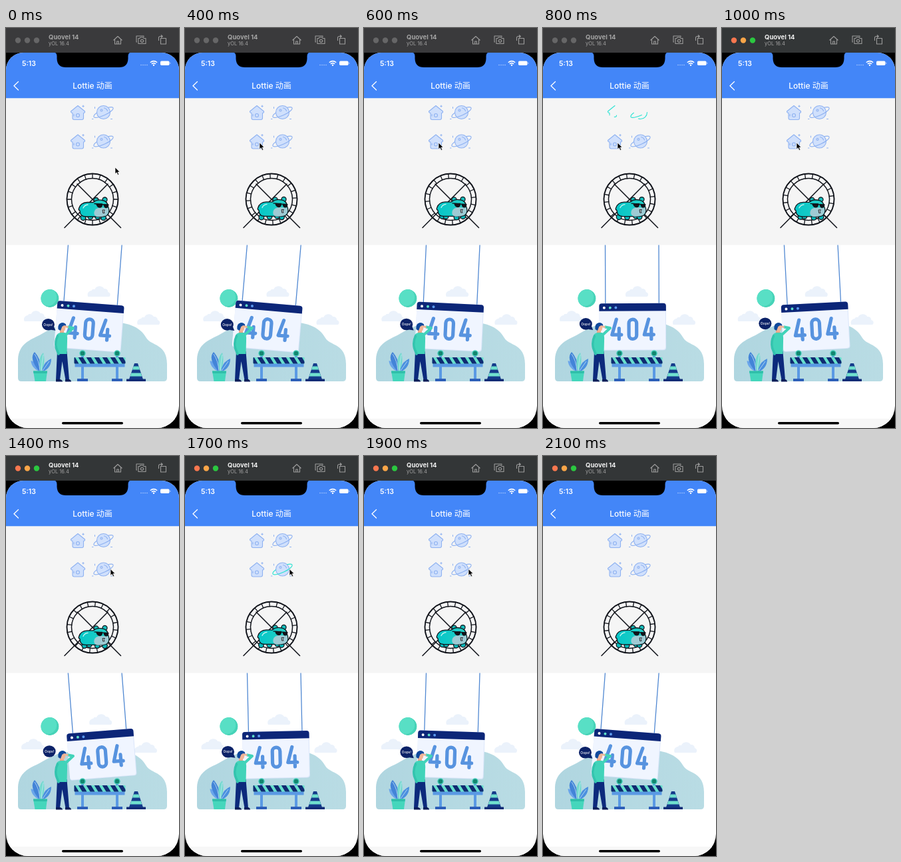
These frames come from a looping animation (260x600 px, 2.2 s). An HTML page:

```html
<!DOCTYPE html>
<html lang="zh">
<head>
<meta charset="utf-8">
<title>Lottie 动画</title>
<style>
  html, body { margin: 0; width: 100%; height: 100%; overflow: hidden; background: #000; }
  svg { display: block; }
  text { font-family: Inter, "Noto Sans CJK SC", "Noto Sans CJK", sans-serif; }
  .ink { fill: none; stroke: #10131a; stroke-linecap: round; stroke-linejoin: round; }
  .tool { fill: none; stroke: #9c9c9c; stroke-width: 1.1; stroke-linejoin: round; }
  .icon { stroke-width: 1.1; stroke-linecap: round; stroke-linejoin: round; }
</style>
</head>
<body>
<svg width="260" height="600" viewBox="0 0 260 600">
  <defs>
    <clipPath id="screen"><path d="M0 63a26 26 0 0 1 26-26H234a26 26 0 0 1 26 26V567a33 33 0 0 1-33 33H33a33 33 0 0 1-33-33Z"/></clipPath>
    <clipPath id="stage"><rect y="325.500" width="260" height="261"/></clipPath>
    <clipPath id="rail"><rect x="102.500" y="494" width="77" height="9.500" rx="1"/></clipPath>
    <clipPath id="round"><circle cx="66" cy="405.500" r="13.600"/></clipPath>
    <linearGradient id="hillTone"><stop stop-color="#b0d6e0"/><stop offset="1" stop-color="#b9dce4"/></linearGradient>
    <linearGradient id="fur"><stop stop-color="#05c6c8"/><stop offset="1" stop-color="#25cfc4"/></linearGradient>
    <path id="cloud" d="M-16 8a6 6 0 0 1 5-9a4 4 0 0 1 5-2a8 8 0 0 1 14-1a5 5 0 0 1 6 5a4 4 0 0 1 2 7Z"/>
    <path id="four" d="M9.500 2.500L3 25.500H17M13.500 16V32" fill="none" stroke="#5793df" stroke-width="5.200" stroke-linecap="round" stroke-linejoin="round"/>
  </defs>

  <!-- window bar -->
  <rect id="bar" width="260" height="37"/>
  <g id="lights"><circle cx="18" cy="18.500" r="4.200"/><circle cx="32" cy="18.500" r="4.200"/><circle cx="46" cy="18.500" r="4.200"/></g>
  <text id="device" x="64" y="17" font-size="9.500" font-weight="700">Quovel 14</text>
  <text x="64" y="26.300" font-size="7.500" fill="#a0a0a0">yOL 16.4</text>
  <g class="tool">
    <path d="M161.500 18.500L168 12.500L174.500 18.500M163.500 17.500V24H172.500V17.500M166.700 24V20H169.300V24"/>
    <path d="M199 15.500H201L202 14H206L207 15.500H210V23.500H199ZM197 21H196V12H207V13.500"/>
    <circle cx="204.500" cy="19.300" r="2.100"/>
    <path d="M232.500 15.500H240.500V24H232.500ZM229.500 19V14.500Q229.500 12.500 232 12.500H235M233 10.500L235.300 12.500L233 14.500"/>
  </g>

  <!-- phone -->
  <g clip-path="url(#screen)">
    <rect y="37" width="260" height="563" fill="#fff"/>
    <rect y="37" width="260" height="68.500" fill="#4386f8"/>
    <rect y="105.500" width="260" height="220" fill="#f5f5f5"/>
    <rect y="586" width="260" height="14" fill="#f7f7f7"/>
    <path d="M73 37Q76 37 76.500 42V46Q77 59 90 59H170Q183 59 183.500 46V42Q184 37 187 37Z"/>
    <rect x="84" y="591" width="92" height="3.400" rx="1.700"/>
  </g>
  <g fill="#fff">
    <text x="24" y="57" font-size="10.500" font-weight="600">5:13</text>
    <text x="130" y="91" font-size="12" font-weight="500" text-anchor="middle">Lottie 动画</text>
    <g opacity=".6"><circle cx="203" cy="55.500" r=".8"/><circle cx="206" cy="55.500" r=".8"/><circle cx="209" cy="55.500" r=".8"/><circle cx="212" cy="55.500" r=".8"/></g>
    <rect x="232" y="49.500" width="13.500" height="6.500" rx="1.700"/>
    <rect x="246.300" y="51.500" width="1" height="2.500" rx=".5" opacity=".6"/>
    <g fill="none" stroke="#fff" stroke-width="1.500">
      <path d="M216.800 51.800Q222 47.400 227.200 51.800M218.800 54Q222 51.200 225.200 54"/>
      <path d="M18.500 80.500L12 86.700L18.500 93" stroke-width="1.300" stroke-linecap="round"/>
    </g>
    <circle cx="222" cy="55.700" r="1.200"/>
  </g>

  <g id="icons"></g>

  <!-- wheel -->
  <g class="ink" stroke-width="1.500">
    <path d="M88 299.500L153 234M172.500 299.500L107 234"/>
    <circle cx="130" cy="257" r="38.500" stroke-width="1.900"/>
    <circle cx="130" cy="257" r="31.500"/>
    <path id="rungs" stroke-width="1.300"/>
  </g>
  <g id="hamster" class="ink" stroke-width="1.300">
    <circle cx="135.500" cy="258" r="3.500" fill="#17bfbd"/>
    <circle cx="148.500" cy="257.500" r="3.500" fill="#17bfbd"/>
    <g id="legs" fill="#08b9ba"></g>
    <path d="M111 274Q108.500 273 109.500 270.500Q112 262 122 261.500H131Q137 256.500 145 258.500Q153 260 153.500 268Q157 276 152 281Q147 284 137 283H120Q111 283 111 274Z" fill="url(#fur)"/>
    <path d="M132.500 276Q134 269.500 142 269.500L153.500 270Q156 277 150 281.500Q143 284 136 283Q131.500 281 132.500 276Z" fill="#9fcbd4" stroke="none"/>
    <path d="M116 270Q118 265.500 123 265" stroke="#c9f7f2"/>
    <path d="M133 263.500L154 265.500"/>
    <path d="M136 264H144.500Q144.500 269.500 140.500 269Q137 268.500 136 264ZM147 265H153.500Q153.500 269.500 150.500 269.500Q148 269.500 147 265Z" fill="#10131a"/>
    <path d="M145.500 273L148.500 273L147 275L148 277.500H146Z" fill="#e9f4f6" stroke-width=".9"/>
  </g>

  <!-- 404 scene -->
  <g clip-path="url(#stage)">
    <g fill="#ebf2fb">
      <use id="cloudA" href="#cloud"/><use id="cloudB" href="#cloud"/><use id="cloudC" href="#cloud"/>
    </g>
    <path d="M23 530Q18 530 18 525V497C19 474 36 468 50 461C66 452 76 445 94 444C115 442 132 441 150 441C186 440 203 450 211 465C218 477 242 473 242 504V525Q242 530 237 530Z" fill="url(#hillTone)"/>
    <g clip-path="url(#round)">
      <circle cx="66" cy="405.500" r="13.600" fill="#47d3b8"/>
      <circle cx="62.500" cy="403.500" r="13.600" fill="#58dfc5"/>
    </g>
    <g id="sign">
      <path d="M93.500 300V415M174 300V415" stroke="#5088d2" stroke-width="1.300"/>
      <rect x="84" y="413" width="100.500" height="70.500" rx="4" fill="#dbe6fa"/>
      <rect x="84" y="413" width="99.500" height="69.500" rx="4" fill="#f0f5ff"/>
      <path d="M84 424.500V417Q84 413 88 413H180.500Q184.500 413 184.500 417V424.500Z" fill="#0c2678"/>
      <circle cx="91.500" cy="419.500" r="2" fill="#fff"/><circle cx="100.500" cy="419.500" r="2" fill="#5ee0c8"/><circle cx="109" cy="419.500" r="2" fill="#5c9af0"/>
      <use href="#four" x="100.300" y="434.500"/>
      <use href="#four" x="148.800" y="434.500"/>
      <rect x="128.600" y="437.100" width="11.600" height="29.400" rx="5.800" fill="none" stroke="#5793df" stroke-width="5.200"/>
    </g>

    <g id="bubble">
      <path id="tail" d="M4 8L11 9L8 2Z" fill="#0c2268"/>
      <ellipse rx="9.500" ry="8.800" fill="#0c2268"/>
      <text y="1.800" font-size="5" font-weight="500" text-anchor="middle" fill="#fff">Oops!</text>
    </g>

    <!-- plant -->
    <path d="M49 515Q38 509 37.500 499Q48 501 50 515Z" fill="#6aa5ea"/>
    <path d="M50 515Q34 496 43 486Q54 498 52 515Z" fill="#4384d8"/>
    <path d="M52 515Q47 495 56 487Q60 500 54 515Z" fill="#74d9cf"/>
    <path d="M54 515Q56 501 68 496Q68 510 56 515Z" fill="#4b90df"/>
    <path d="M51 515Q50 499 43 489M53 515Q54 500 56 490M55 514L65 500" fill="none" stroke="#d5eef6" stroke-width=".7"/>
    <path d="M41 514.500H62L60 530H43.500Z" fill="#45d6bc"/>
    <path d="M41 514.500H62L61.500 518H41.500Z" fill="#2fbfa9"/>

    <!-- man -->
    <path d="M77 485H91.500L95 528H89.500L84.500 500L81 528H75Z" fill="#0c2a7c"/>
    <path d="M89 527H95Q98 528 98 530.500H89ZM75 527H81Q85 528 85 530.500H75Z" fill="#0a1c58"/>
    <path d="M81 451H87V460H81Z" fill="#e8a585"/>
    <path d="M75.500 464Q76 457 83 457H89Q93 460 92 470L91.500 489H77Z" fill="#41d3b9"/>
    <path d="M77.500 462Q73.500 470 75.500 480L79 489" fill="none" stroke="#33c4ae" stroke-width="3.600" stroke-linecap="round"/>
    <path d="M89 461L101 450L93.500 448.500" fill="none" stroke="#41d3b9" stroke-width="4" stroke-linecap="round" stroke-linejoin="round"/>
    <ellipse cx="84.500" cy="450" rx="4.800" ry="5.800" fill="#f1b496"/>
    <path d="M78.500 452Q77 443.500 84 442Q90 442 90.500 446.500L84.500 447.500L82 454Z" fill="#104a9d"/>
    <path d="M92.500 448.500L87.500 447.500" stroke="#f1b496" stroke-width="2.800" stroke-linecap="round"/>

    <!-- barrier -->
    <path d="M113 489H117V526H113ZM165 489H169V526H165Z" fill="#5a99e4"/>
    <path d="M107 526H123V530H107ZM159 526H175V530H159Z" fill="#2d5fb8"/>
    <path d="M103.500 503H178.500V508.500H103.500Z" fill="#5a99e4"/>
    <g clip-path="url(#rail)">
      <rect x="102" y="493" width="78" height="11" fill="#67dfcc"/>
      <path id="stripes" stroke="#102a72" stroke-width="6"/>
    </g>
    <g fill="#12866f" stroke="#43cdb9" stroke-width="1.500"><circle cx="115" cy="488" r="4"/><circle cx="167" cy="488" r="4"/></g>

    <!-- cone -->
    <path d="M193 503H198L206 527H185Z" fill="#153b8b"/>
    <path d="M191.600 507.500H199.400L201 512.500H190ZM188.300 517.500H202.700L204.300 522.500H186.700Z" fill="#70e0ce"/>
    <path d="M181 526.500H210V530H181Z" fill="#0f2c76"/>
  </g>

  <path id="cursor" d="M0 0V9.800L2.300 7.700L4 11.500L5.700 10.700L4.100 7.100H7.100Z" stroke="#fff" stroke-width=".7"/>
</svg>
<script>
const LOOP = 2200, STEP = 100, ICON_TIME = 300;
const $ = id => document.getElementById(id);
const clamp = v => Math.max(0, Math.min(1, v));
const place = (id, x, y) => $(id).setAttribute('transform', `translate(${x} ${y})`);

const house = `
  <path data-line d="M0-10.500L-10.500-2Q-10.500 .5-8 .5V8Q-8 10.500-5.500 10.500H6Q8.500 10.500 8.500 8V.5Q11 .5 10.500-2Z"/>
  <circle data-line cy="4" r="2.500"/>
  <g data-spark><path d="M-6 2.500V5M8-8.500V-11M6.800-9.700H9.200"/></g>`;
const planet = `
  <circle data-line r="10"/>
  <path data-ring transform="rotate(-25)" d="M-9.500-3.600A16 4.500 0 1 0 9.500-3.600"/>
  <g data-spark><path d="M1-6.500Q5-5.500 6-2M-13-8V-6M11 10H13M-15.500 10H-17"/><circle cx="-3" cy="-3" r="1.500"/></g>`;

const icons = [
  [house, 108, 127, 700], [planet, 146.5, 126.5, 700],
  [house, 108, 170.5, null], [planet, 146.5, 170, 1500]
].map(([shape, x, y, start]) => {
  const g = document.createElementNS('http://www.w3.org/2000/svg', 'g');
  g.innerHTML = shape;
  g.setAttribute('class', 'icon');
  g.setAttribute('transform', `translate(${x} ${y})`);
  $('icons').append(g);
  const lines = [...g.querySelectorAll('[data-line],[data-ring]')];
  lines.forEach(el => el.setAttribute('pathLength', 100));
  return { g, lines, start };
});

// Icons trace themselves in teal, then fill and settle to blue.
function drawIcon({ g, lines, start }, t) {
  const p = start === null || t < start ? 1 : clamp((t - start) / ICON_TIME);
  for (const el of lines) {
    const ring = 'ring' in el.dataset;
    const trace = ring ? clamp(p * 1.5) : clamp(p * 1.2 - .1);
    const blue = p === 1 || (!ring && p > .5);
    el.style.stroke = blue ? '#8fb2f1' : '#2ce3d3';
    el.style.fill = !ring && p > .5 ? '#d0e0fc' : 'none';
    el.style.strokeDasharray = p > .5 ? 'none' : `${trace * 100} 200`;
    el.style.visibility = p > 0 ? 'visible' : 'hidden';
  }
  const spark = g.querySelector('[data-spark]');
  spark.style.cssText = `fill:none;stroke:#8fb2f1;opacity:${p > .5 ? 1 : 0}`;
}

$('stripes').setAttribute('d', Array.from({ length: 8 }, (_, i) => `M${99 + i * 12} 492l8 13`).join(''));

function drawWheel(t) {
  let d = '';
  for (let i = 0; i < 20; i++) {
    const a = Math.PI * (i / 10 + t / LOOP), c = Math.cos(a), s = Math.sin(a);
    d += `M${130 + 31.5 * c} ${257 + 31.5 * s}L${130 + 38.5 * c} ${257 + 38.5 * s}`;
  }
  $('rungs').setAttribute('d', d);
  const run = t / LOOP * Math.PI * 2 * 5;
  place('hamster', 0, .6 * Math.sin(run * 2));
  $('legs').innerHTML = [116, 125, 139, 147].map((x, i) =>
    `<ellipse cx="${x + 2 * Math.sin(run + i * 2)}" cy="${283.5 + Math.cos(run + i * 2)}" rx="3.800" ry="4"/>`).join('');
}

function drawScene(t) {
  const s = Math.cos((t - 235) / 2100 * Math.PI * 2);
  $('sign').setAttribute('transform', `rotate(${.4 + 5.2 * s} 134 326)`);
  place('cloudA', 42 + 2.3 * s, 432);
  place('cloudB', 212 + 2.5 * s, 437);
  place('cloudC', 140.5 - 1.5 * s, 395);
  place('bubble', 64.2 - s, 444 + s);
  $('tail').setAttribute('transform', `scale(${clamp((s + .55) * 5)})`);
}

const trip = [[0, 164, 209], [300, 112, 172], [1100, 112, 172], [1300, 157, 169.5], [LOOP, 157, 169.5]];
function drawCursor(t) {
  const i = trip.findIndex(k => k[0] > t);
  const [t0, x0, y0] = trip[i - 1], [t1, x1, y1] = trip[i];
  const u = (t - t0) / (t1 - t0), e = u * u * (3 - 2 * u);
  place('cursor', x0 + (x1 - x0) * e, y0 + (y1 - y0) * e);
  $('cursor').style.visibility = t < 2000 ? 'visible' : 'hidden';
}

function drawWindow(t) {
  const active = t >= 900;
  ['#f9774f', '#f9a548', '#2bc840'].forEach((c, i) => {
    $('lights').children[i].style.fill = active ? c : '#666667';
  });
  $('bar').style.fill = active ? '#333637' : '#3a3a3c';
  $('device').style.fill = active ? '#f0f0f0' : '#a4a4a4';
}

const begin = performance.now();
function frame() {
  const t = Math.floor((performance.now() - begin) % LOOP / STEP) * STEP;
  icons.forEach(icon => drawIcon(icon, t));
  drawWheel(t);
  drawScene(t);
  drawCursor(t);
  drawWindow(t);
  requestAnimationFrame(frame);
}
frame();
</script>
</body>
</html>
```
